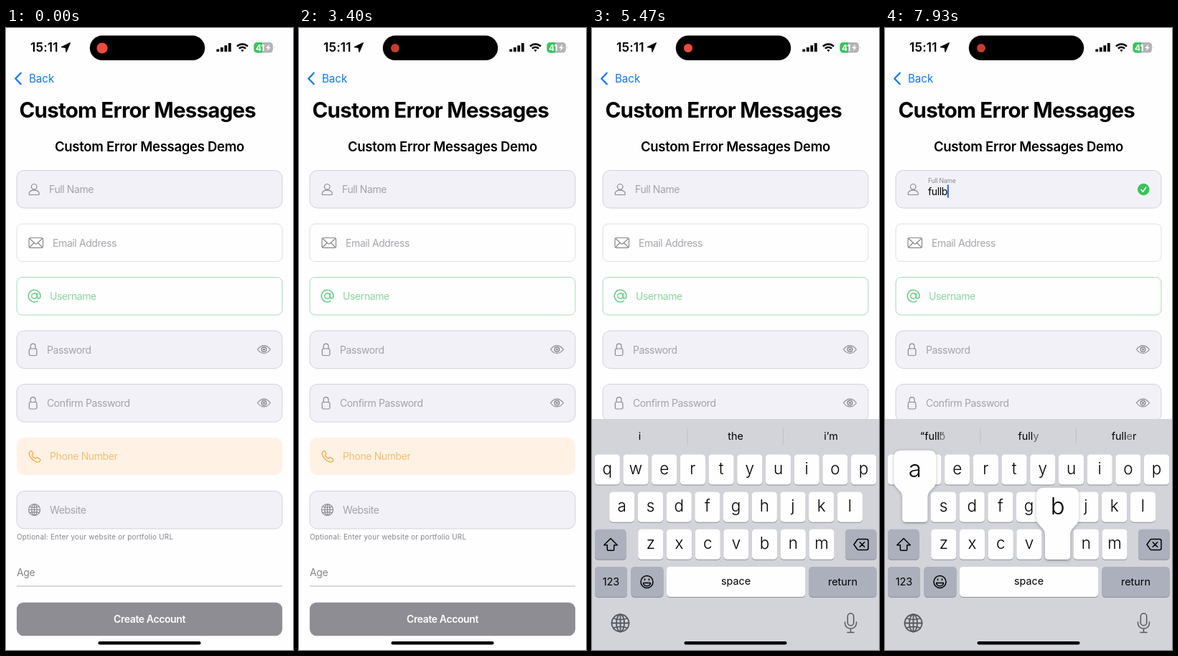
An HTML page that plays this animation: 400 px wide and 867 px high, repeating every 8 s.

```html
<!DOCTYPE html>
<html lang="en">
<head>
<meta charset="utf-8">
<title>Custom Error Messages</title>
<style>
html, body { margin: 0; width: 100%; height: 100%; overflow: hidden; background: #fefdff; }
svg { display: block; width: 100%; height: 100%; }
text { font: 14px Inter, "Open Sans", sans-serif; font-optical-sizing: none; letter-spacing: -.028em; fill: currentColor; white-space: pre; }
.line { fill: none; stroke: currentColor; stroke-width: 1.2; stroke-linecap: round; stroke-linejoin: round; }
.mid { text-anchor: middle; }
.title { font-size: 29.5px; font-weight: 700; letter-spacing: -.026em; }
.heading { font-size: 18.5px; font-weight: 600; letter-spacing: -.0155em; }
.clock { font-size: 17.2px; font-weight: 600; letter-spacing: .01em; }
.back { font-size: 15.2px; letter-spacing: -.005em; }
.note { font-size: 9.9px; letter-spacing: .024em; }
.strong { font-weight: 600; }
.field { color: #89898e; }
.field > text { opacity: .75; }
.box { fill: #f2f1f8; stroke: #d2d1da; }
.plain { fill: #fefdff; stroke: #dedde2; }
.green { color: #62cb7e; }
.green .plain { stroke: #a2deb1; }
.orange { color: #f0ad45; }
.orange .box { fill: #fff2e5; stroke: none; }

.tint { animation: tint 8s infinite; }
.edge { animation: edge 8s infinite; }
.float { animation: float 8s infinite; }
.error { color: #d8392f; animation: error 8s infinite; }
.below { animation: below 8s infinite; }
.valid { animation: valid 8s infinite; }
.keyboard { animation: rise 8s infinite; }
@keyframes tint { 0%, 86.5%, 94%, 100% { color: #89898e; } 88%, 91.1% { color: #e8432f; } }
@keyframes edge { 0%, 86.5%, 94%, 100% { stroke: #d2d1da; } 88%, 91.1% { stroke: #ec4a3c; } }
@keyframes float {
  0%, 86.5% { transform: none; opacity: .75; }
  89%, 100% { transform: translateY(-13.6px) scale(.62); opacity: 1; }
}
@keyframes error { 0%, 86.7%, 93.5%, 100% { opacity: 0; } 89%, 91.1% { opacity: 1; } }
@keyframes below { 0%, 86.5%, 94.5%, 100% { transform: none; } 89.5%, 91.1% { transform: translateY(18px); } }
@keyframes valid { 0%, 91.1% { opacity: 0; } 94%, 100% { opacity: 1; } }
@keyframes rise {
  0%, 47.12% { transform: translateY(322px); animation-timing-function: cubic-bezier(.38, .7, .125, 1); }
  53.4%, 100% { transform: none; }
}

.key { fill: #fefefe; }
.dark { fill: #abb0bc; }
.shade { fill: #8b8e95; }
.letter { font-size: 22.5px; font-weight: 300; letter-spacing: 0; text-anchor: middle; }
.small { font-size: 14.4px; letter-spacing: 0; text-anchor: middle; }
.pop path { fill: #fefefe; filter: drop-shadow(0 1px 2px #0004); }
.pop text { font-size: 33px; font-weight: 300; letter-spacing: 0; text-anchor: middle; }
</style>
</head>
<body>
<svg viewBox="0 0 400 867" color="#000">
  <defs>
    <g id="person" class="line">
      <circle cx="39.2" cy="221.3" r="3.8"/>
      <path d="M33.6 232.5q-1.9 0-1.5-1.8c.9-6.2 13.3-6.2 14.2 0q.4 1.8-1.5 1.8z"/>
    </g>
    <g id="lock" class="line">
      <rect x="32.3" y="447" width="10.6" height="9.5" rx="1.8"/>
      <path d="M34.2 447v-3.4c0-4.6 6.8-4.6 6.8 0v3.4"/>
    </g>
    <g id="eye" class="line">
      <path d="M350.5 448c5.5-7.3 12.5-7.3 18 0c-5.5 7.3-12.5 7.3-18 0z"/>
      <circle cx="359.5" cy="448" r="3.3" stroke-width="1.5"/>
      <circle cx="359.5" cy="448" r="1" fill="currentColor"/>
    </g>
    <g id="globe" class="line">
      <circle r="8"/><ellipse rx="3.7" ry="8"/>
      <path d="M0-8V8M-8 0H8M-6.5-4.5q6.5 2.6 13 0M-6.5 4.5q6.5-2.6 13 0"/>
    </g>
  </defs>
  <rect width="400" height="867" fill="#fefdff"/>

  <text class="clock" x="34" y="33">15:11</text>
  <path d="M89.3 20.8L77.5 26.5l5.7.8.8 5.9z" stroke="#000" stroke-width="1.3" stroke-linejoin="round"/>
  <rect x="116.8" y="10.6" width="160.4" height="34.4" rx="17.2"/>
  <circle id="dot" cx="134" cy="28" r="6" fill="#ef4b3d"/>
  <path d="M295.3 33v-3.5M300.8 33v-6M306.3 33v-8.8M311.8 33v-12" stroke="#000" stroke-width="3.8"/>
  <g fill="none" stroke="#000" stroke-width="2.5">
    <path d="M322 25.6a10.6 10.6 0 0 1 15 0M324.9 28.7a6.5 6.5 0 0 1 9.2 0"/>
    <path d="M327.4 30.8q2.1-1.8 4.2 0l-2.1 2.4z" fill="#000" stroke="none"/>
  </g>
  <rect x="345.5" y="20" width="26.5" height="14.5" rx="4.6" fill="#b4b3b9"/>
  <path d="M357 20h-6.9a4.6 4.6 0 0 0-4.6 4.6v5.3a4.6 4.6 0 0 0 4.6 4.6h6.9z" fill="#36c65a"/>
  <path d="M373.3 25q1.6 2.2 0 4.5z" fill="#b4b3b9"/>
  <text x="348" y="31.6" color="#fff" style="font-size:12px;font-weight:700">41</text>
  <path d="M367.3 22.8l-5.2 5.2h3l-1.3 4 5.3-5.3h-3z" fill="#fff"/>

  <g color="#0a7af6">
    <path class="line" d="M20.7 62.8L13.2 70.5l7.5 7.7" style="stroke-width:2.3"/>
    <text class="back" x="32" y="76">Back</text>
  </g>
  <text class="title" x="18.5" y="125">Custom Error Messages</text>
  <text class="heading mid" x="200" y="172">Custom Error Messages Demo</text>

  <g class="field tint">
    <rect class="box edge" x="15" y="198.5" width="370" height="52.5" rx="10.5"/>
    <use href="#person"/>
    <g transform="translate(60 230)"><text class="float">Full Name</text></g>
  </g>
  <text id="typed" x="60" y="232.5"></text>
  <rect id="caret" y="218.5" width="2" height="18" fill="#1b6fe0"/>
  <g class="valid">
    <circle cx="360.3" cy="225" r="8.3" fill="#36c558"/>
    <path class="line" d="M356.8 225.3l2.6 3 4.4-6.3" color="#fff" style="stroke-width:1.5"/>
  </g>
  <g class="error">
    <circle cx="21" cy="263" r="5.2" fill="currentColor"/>
    <path d="M21 260v3.5M21 265v1.2" stroke="#fff" stroke-width="1.2"/>
    <text class="note" x="34.5" y="266.5" style="font-weight:500">Name must be at least 2 characters</text>
  </g>

  <g class="below">
    <g class="field">
      <rect class="plain" x="15" y="273" width="370" height="52.5" rx="7.5"/>
      <g class="line">
        <rect x="32" y="292.5" width="19.5" height="13.8" rx="2.2"/>
        <path d="M33 293.5l7.2 6.8q1.6 1.4 3.2 0l7.2-6.8M33 305.5l6-6M50.5 305.5l-6-6"/>
      </g>
      <text x="65" y="304.5">Email Address</text>
    </g>
    <g class="field green">
      <rect class="plain" x="15" y="347.5" width="370" height="52.5" rx="7.5"/>
      <g class="line" style="stroke-width:1.4">
        <circle cx="39.5" cy="373.5" r="3.7"/>
        <path d="M43.3 369.8v5c0 3.4 4.7 3 4.7-1.3a8.4 8.4 0 1 0-3.7 7"/>
      </g>
      <text x="61" y="379">Username</text>
    </g>
    <g class="field">
      <rect class="box" x="15" y="422" width="370" height="52.5" rx="10.5"/>
      <use href="#lock"/><use href="#eye"/>
      <text x="57" y="453.5">Password</text>
    </g>
    <g class="field">
      <rect class="box" x="15" y="496.5" width="370" height="52.5" rx="10.5"/>
      <use href="#lock" y="74.5"/><use href="#eye" y="74.5"/>
      <text x="57" y="528">Confirm Password</text>
    </g>
    <g class="field orange">
      <rect class="box" x="14.9" y="570.9" width="370.2" height="52.3" rx="11"/>
      <path class="line" style="stroke-width:1.4" d="M34.3 589.7c-3.6 2.5-2.4 6.7 2.3 11.2 4.6 4.5 8.9 5.7 11 2.3q.8-1.4-.5-2.4l-2.9-2q-1.2-.8-2.1.2l-1.1 1.2c-1.8-.6-4.1-2.9-4.8-4.7l1.3-1.2q.9-1 .2-2l-1.9-2.5q-.7-.8-1.5-.1z"/>
      <text x="61" y="602">Phone Number</text>
    </g>
    <g class="field">
      <rect class="box" x="15" y="645.5" width="370" height="52.5" rx="10.5"/>
      <use href="#globe" x="39.5" y="671.5"/>
      <text x="61" y="676.5">Website</text>
    </g>
    <g color="#85858a">
      <text class="note" x="15" y="712.8">Optional: Enter your website or portfolio URL</text>
      <text x="15" y="763.5">Age</text>
      <path d="M15 778h370" stroke="#cbcacf" stroke-width="1.4"/>
    </g>
    <rect x="14.9" y="800.8" width="370.2" height="46.4" rx="9.5" fill="#8e8d93"/>
    <text class="mid strong" x="200" y="829" color="#fff">Create Account</text>
  </g>

  <g class="keyboard">
    <rect y="545" width="400" height="322" fill="#d2d4da"/>
    <path d="M133 557v24M266.5 557v24" stroke="#bdc0c6"/>
    <g id="words"></g>
    <g id="keys"></g>
    <g class="line" style="stroke-width:1.5">
      <path d="M26 711.5l9.3 9.3h-4.6v6.2q0 1.2-1.2 1.2h-7q-1.2 0-1.2-1.2v-6.2h-4.6z"/>
      <path d="M371.5 712.5h11q2.5 0 2.5 2.5v10q0 2.5-2.5 2.5h-11q-1 0-1.7-.8l-4.8-6.7 4.8-6.7q.7-.8 1.7-.8zM373.2 716.7l6.6 6.6M379.8 716.7l-6.6 6.6"/>
      <circle cx="76.5" cy="772" r="8.5"/>
      <path d="M71.5 773.5h10c-.7 5.6-9.3 5.6-10 0zM73.5 768v1.5M79.5 768v1.5"/>
    </g>
    <g color="#55585f">
      <use href="#globe" transform="translate(39.5 829.5) scale(1.5)"/>
      <g class="line" style="stroke-width:1.5">
        <rect x="356.3" y="816" width="8.4" height="17" rx="4.2"/>
        <path d="M352.5 828v1.5c0 10.2 16 10.2 16 0V828M360.5 837.3v5M356 842.5h9"/>
      </g>
    </g>
    <g id="pops"></g>
  </g>
  <rect x="128.5" y="855" width="143" height="4.6" rx="2.3"/>
</svg>

<script>
const LOOP = 8000;
const $ = id => document.getElementById(id);
const clamp = v => Math.max(0, Math.min(1, v));

// Keyboard layout: letters, centre of the first key, top
const rows = [["qwertyuiop", 21.3, 594.6], ["asdfghjkl", 41.8, 646.7], ["zxcvbnm", 81.8, 698.8]];
const spots = {};
const cap = (x, y, w, kind = "key") =>
  `<rect class="shade" x="${x}" y="${y + 1}" width="${w}" height="42" rx="4.6"/>` +
  `<rect class="${kind}" x="${x}" y="${y}" width="${w}" height="42" rx="4.6"/>`;
const label = (x, y, s, kind) => `<text class="${kind}" x="${x}" y="${y}">${s}</text>`;

let caps = "";
for (const [letters, left, y] of rows) {
  [...letters].forEach((c, i) => {
    const x = left + i * 39.7;
    spots[c] = [x, y];
    caps += cap(x - 17.6, y, 35.2) + label(x, y + 27.3, c, "letter");
  });
}
caps += cap(4, 698.8, 43.5, "dark") + cap(353, 698.8, 43.5, "dark");
caps += cap(4, 750.9, 45, "dark") + cap(54.5, 750.9, 45, "dark") + cap(104, 750.9, 193.5) + cap(302.5, 750.9, 94, "dark");
caps += label(26.5, 777, "123", "small") + label(200.5, 775.5, "space", "small") + label(349.5, 777, "return", "small");
$("keys").innerHTML = caps;

// Pressed keys: letter, down, up
const presses = [
  ["f", 6820, 6940], ["u", 7140, 7250], ["l", 7390, 7500],
  ["l", 7580, 7690], ["b", 7790, 7960], ["a", 7900, 8000]
];
const balloon = "M-29.5-48q0-10 10-10h39q10 0 10 10v32c0 12-11.9 12-11.9 24v29.5q0 4.6-4.6 4.6h-26q-4.6 0-4.6-4.6v-29.5c0-12-11.9-12-11.9-24z";
$("pops").innerHTML = presses.map(([c]) =>
  `<g class="pop" transform="translate(${spots[c]})"><path d="${balloon}"/><text y="-21">${c}</text></g>`).join("");
const pops = [...$("pops").children];

const typing = [[0, ""], [6920, "f"], [7240, "fu"], [7490, "ful"], [7680, "full"], [7900, "fullb"]];
const hints = [
  [0, ["i", "the", "i’m"]],
  [6980, ["“f”", "for", "first"]],
  [7320, ["“fu”", "fun", "full"]],
  [7560, ["“ful”", "full", "fully"]],
  [7740, ["“full”", "fully", "fuller"]]
];
const latest = (list, t) => list.filter(([at]) => at <= t).pop()[1];
const faded = (s, o, dx = 0) => `<tspan dx="${dx}" fill-opacity="${o}">${s}</tspan>`;

function hintWords(t) {
  const p = clamp((t - 7880) / 110);
  if (!p) return latest(hints, t);
  return ["“full" + faded("”", 1 - p) + faded("b", p, -7), "full" + faded("y", 1 - p), "full" + faded("e", 1 - p) + "r"];
}

function caretOpacity(t) {
  if (t < 3700) return 0;
  if (t < 4270 || t > 6920) return 1;
  const phase = (t - 3770) % 1000;
  return phase < 500 ? clamp(phase / 180) : 1 - clamp((phase - 500) / 180);
}

let shown = "";
function draw(t) {
  const dim = Math.max(0, Math.cos((t - 410) / 1500 * 2 * Math.PI));
  $("dot").setAttribute("opacity", 1 - .18 * dim);
  $("dot").setAttribute("r", 6 + 1.6 * clamp(1 - t / 400));

  $("typed").textContent = latest(typing, t);
  $("caret").setAttribute("x", 60 + $("typed").getComputedTextLength());
  $("caret").setAttribute("opacity", caretOpacity(t));

  const words = hintWords(t).map((w, i) => label([66.5, 200, 333][i], 574, w, "small")).join("");
  if (words !== shown) $("words").innerHTML = shown = words;
  pops.forEach((g, i) => {
    const [, down, up] = presses[i];
    g.setAttribute("visibility", t >= down && t < up ? "visible" : "hidden");
  });
}

const start = performance.now();
function tick() {
  draw((performance.now() - start) % LOOP);
  requestAnimationFrame(tick);
}
tick();
</script>
</body>
</html>
```
